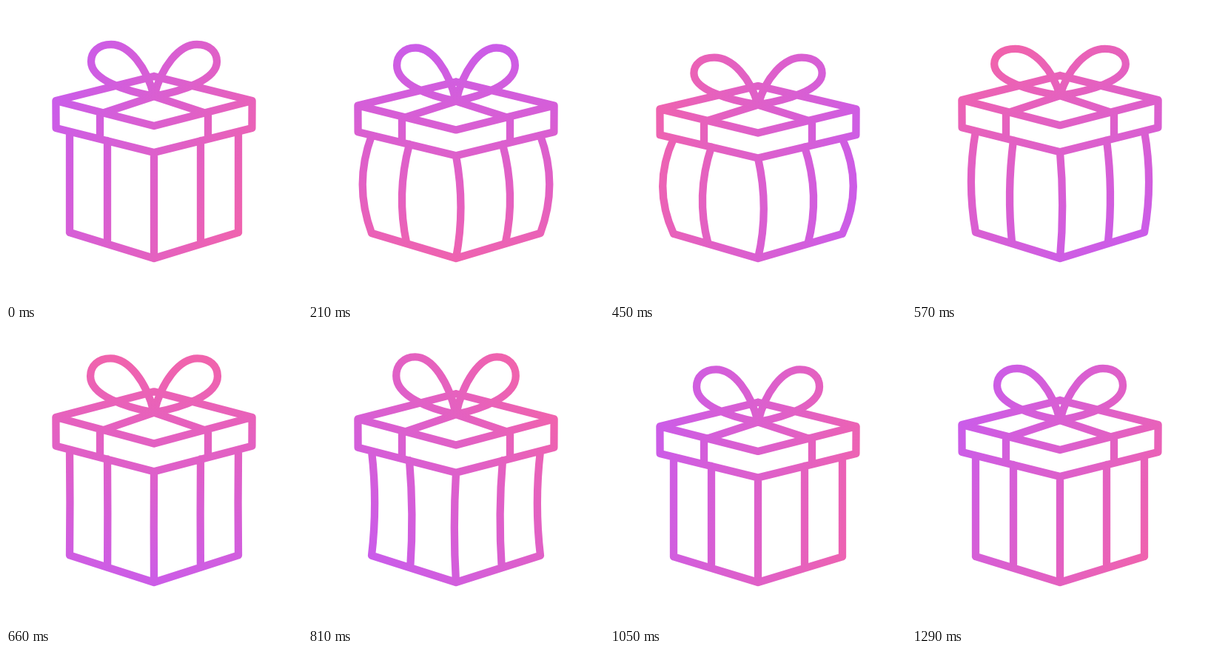
Animation, 400 px wide and 400 px high, one loop 3320 ms. Source, as an HTML page with a canvas:

```html
<!DOCTYPE html>
<html lang="en">
<head>
<meta charset="utf-8">
<title>Gift box</title>
<style>
html, body { margin: 0; height: 100%; overflow: hidden; background: #fff; }
canvas { display: block; }
</style>
</head>
<body>
<canvas width="400" height="400"></canvas>
<script>
const ctx = document.querySelector('canvas').getContext('2d');
const LOOP = 3320, STEP = 30, END = 1290;
const MID = 200, FLOOR = 341, KNOT = 122;

const ease = u => (1 - Math.cos(Math.PI * u)) / 2;

// Eased swing through [time, value] stops, at rest at both ends
function swing(t, ...stops) {
  let a = [0, 0];
  for (const b of [...stops, [END, 0]]) {
    if (t <= b[0]) return a[1] + (b[1] - a[1]) * ease((t - a[0]) / (b[0] - a[0]));
    a = b;
  }
  return 0;
}

function line(...points) {
  points.forEach(([x, y], i) => i ? ctx.lineTo(x, y) : ctx.moveTo(x, y));
}

// Upright edge of the body, bent by pull, its foot moved along the base by shift
function upright(x, top, pull, shift = 0) {
  const foot = FLOOR - (x + shift) * 35 / 114;
  ctx.moveTo(x, top);
  ctx.quadraticCurveTo(x + pull, (top + foot) / 2, x + shift, foot);
}

function halfBox(bulge) {
  line([0, 95], [132.6, 128], [0, 162]);
  line([132.6, 128], [132.4, 165], [0, 198]);
  line([0, KNOT], [73, 146], [73, 178]);
  line([0, FLOOR], [114, 306]);
  upright(63, 182, 1.4 * bulge, .28 * bulge);
  upright(114, 170, 1.9 * bulge);
}

// One loop of the bow, with the knot at 0, 0
function bowLoop() {
  ctx.moveTo(0, 0);
  ctx.bezierCurveTo(10, -40, 34, -70, 58, -70);
  ctx.bezierCurveTo(75, -70, 85, -60, 85, -47);
  ctx.bezierCurveTo(85, -22, 38, -7, 0, 0);
}

function draw(t) {
  const tall = 1 + swing(t, [410, -.058], [710, .055], [990, -.012]);
  const bulge = swing(t, [340, 19], [780, -4.5], [1050, 0]);
  const bowW = 1 + swing(t, [210, -.06], [570, .045], [790, -.05]);
  const bowH = 1 + swing(t, [210, .03], [540, -.11], [740, .13], [1000, .015]);
  const turn = (205 + 360 * ease((t / END) ** .7)) * Math.PI / 180;

  ctx.resetTransform();
  ctx.clearRect(0, 0, 400, 400);
  ctx.beginPath();
  for (const side of [-1, 1]) {
    ctx.setTransform(side, 0, 0, tall, MID, FLOOR * (1 - tall));
    halfBox(bulge);
    ctx.setTransform(side * bowW, 0, 0, bowH, MID, FLOOR - (FLOOR - KNOT) * tall);
    bowLoop();
  }
  ctx.setTransform(1, 0, 0, tall, MID, FLOOR * (1 - tall));
  ctx.moveTo(0, 198);
  ctx.quadraticCurveTo(bulge, 270, 0, FLOOR);

  ctx.resetTransform();
  const dx = 158 * Math.cos(turn), dy = 158 * Math.sin(turn);
  const paint = ctx.createLinearGradient(MID + dx, MID + dy, MID - dx, MID - dy);
  paint.addColorStop(0, '#ca5cea');
  paint.addColorStop(1, '#f063ad');
  ctx.strokeStyle = paint;
  ctx.lineWidth = 10.3;
  ctx.lineJoin = ctx.lineCap = 'round';
  ctx.stroke();
}

const start = performance.now();
function tick() {
  const t = (performance.now() - start) % LOOP;
  draw(Math.min(END, Math.floor(t / STEP) * STEP));
  requestAnimationFrame(tick);
}
tick();
</script>
</body>
</html>
```
